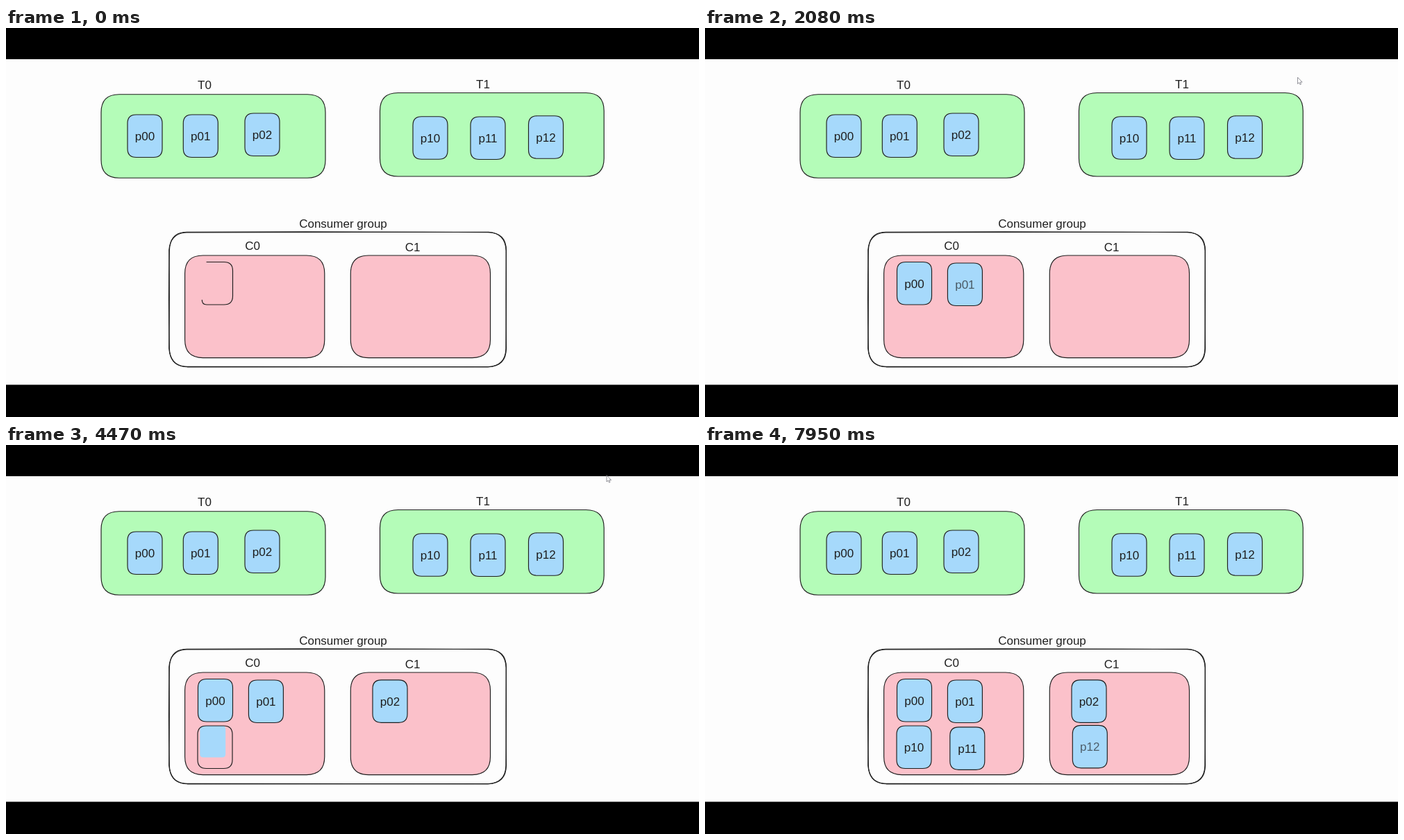
Animation of 998x561 px, one loop 7990 ms. Source, as an HTML page:

```html
<!DOCTYPE html>
<html lang="en">
<head>
<meta charset="utf-8">
<title>Partition assignment</title>
<style>
  html, body { margin: 0; width: 100%; height: 100%; overflow: hidden; background: #000; }
  svg { display: block; width: 100%; height: 100%; }
  path { stroke: #1e1e1e; stroke-width: 1.15; stroke-linecap: round; stroke-linejoin: round; fill: none; }
  text { font: 17px "Liberation Sans", Arial, sans-serif; fill: #1e1e1e; text-anchor: middle; }
</style>
</head>
<body>
<svg id="stage" viewBox="0 0 998 561" xmlns="http://www.w3.org/2000/svg"></svg>
<script>
const LOOP = 7990;
const GREEN = '#b4fcb8', PINK = '#fbc1ca', BLUE = '#a6d9fb';
const CARD = { w: 50, h: 61.5, r: 12.5 };
const stage = document.getElementById('stage');
const clamp = v => Math.min(1, Math.max(0, v));

function add(tag, attrs, text = '') {
  const el = document.createElementNS(stage.namespaceURI, tag);
  for (const name in attrs) el.setAttribute(name, attrs[name]);
  el.textContent = text;
  return stage.appendChild(el);
}

// Rounded box drawn as eight pieces of equal time; the current piece grows from its start.
function boxPath(x, y, w, h, r, progress = 1) {
  const a = w - 2 * r, b = h - 2 * r;
  const pieces = [
    ['l', a, 0], ['q', r, 0, r, r], ['l', 0, b], ['q', 0, r, -r, r],
    ['l', -a, 0], ['q', -r, 0, -r, -r], ['l', 0, -b], ['q', 0, -r, r, -r]
  ];
  let d = `M${x + r} ${y}`;
  pieces.forEach(([cmd, ...nums], i) => {
    const part = clamp(progress * 8 - i);
    if (part > 0) d += cmd + nums.map(n => n * part).join(' ');
  });
  return progress >= 1 ? d + 'z' : d;
}

function box(x, y, w, h, r, fill) {
  return add('path', { d: boxPath(x, y, w, h, r), style: `fill:${fill}` });
}

function label(text, x, middle) {
  return add('text', { x, y: middle + 6 }, text);
}

function card(text, x, y) {
  box(x, y, CARD.w, CARD.h, CARD.r, BLUE);
  label(text, x + 25, y + 31);
}

add('rect', { y: 45, width: 998, height: 469.5, fill: '#fdfdfd' });

box(137, 95.7, 323, 120.5, 26, GREEN);
box(538.5, 93.5, 322.7, 120.5, 26, GREEN);
label('T0', 286, 82.3);
label('T1', 687, 80.5);
card('p00', 175, 125);
card('p01', 255.3, 125);
card('p02', 344, 123);
card('p10', 586, 127.7);
card('p11', 669, 128);
card('p12', 752.5, 126.7);

// Hand-drawn double outline
add('path', { d: 'M261 294.3Q480 293.4 694 294.8Q720.5 295 720.4 321Q719.7 390 720.5 462Q720 488.6 694 488.5Q480 489.3 261 488.8Q235.8 488 235.3 462Q233.6 390 235.3 321Q236 294 261 294.3z' });
add('path', { d: 'M260 294.9Q480 295.2 695 294.2Q719 296 720.2 321Q720.8 390 719.9 463Q719 487.5 694 488.9Q480 488 261 488.4Q237 488 234.7 462Q235.8 390 234.8 320Q237 296 260 294.9z' });
box(257.6, 328, 201.2, 147.6, 26, PINK);
box(496.3, 328, 201.2, 147.6, 26, PINK);
label('Consumer group', 485.5, 282);
label('C0', 355, 314);
label('C1', 585.7, 316);

// Each entry: label, x, y, moment its fill is complete
const assigned = [
  ['p00', 276.5, 337.5, 330],
  ['p01', 349.4, 339, 1614],
  ['p02', 528, 338.8, 2983],
  ['p10', 276, 405, 4515],
  ['p11', 352.8, 406.8, 6060],
  ['p12', 529.3, 404.3, 7484]
].map(([text, x, y, filled], i, all) => ({
  x, y, filled,
  before: i ? filled - all[i - 1][3] : 1430,
  after: i < all.length - 1 ? all[i + 1][3] - filled : 1430,
  fill: add('path', { style: `fill:${BLUE};stroke:none` }),
  line: add('path', {}),
  text: label(text, x + 25, y + 31)
}));

const cursor = add('path', {
  d: 'M0 0V9L2.1 7.2L3.6 10.2L5 9.5L3.6 6.6H6.2z',
  style: 'fill:#fff;stroke:#77777f;stroke-width:.8'
});

function drawCard(c, time) {
  const outline = clamp((time - c.filled + c.before * .5) / (c.before * .39));
  const fill = clamp((time - c.filled + c.before * .11) / (c.before * .11));
  c.line.setAttribute('d', outline ? boxPath(c.x, c.y, CARD.w, CARD.h, CARD.r, outline) : '');
  c.fill.setAttribute('d', fill
    ? boxPath(c.x + CARD.r * (1 - fill), c.y, CARD.w * fill, CARD.h * fill, CARD.r * fill ** 3)
    : '');
  c.text.setAttribute('opacity', clamp((time - c.filled) / (c.after * .5)));
}

function drawCursor(time) {
  const move = clamp((time - 2100) / 90);
  cursor.setAttribute('transform', `translate(${853.5 + 11.5 * move} ${71.5 - 27.5 * move})`);
  cursor.setAttribute('visibility', time >= 1950 && time < 4750 ? 'visible' : 'hidden');
}

const start = performance.now();
function frame() {
  const time = (performance.now() - start) % LOOP;
  assigned.forEach(c => drawCard(c, time));
  drawCursor(time);
  requestAnimationFrame(frame);
}
frame();
</script>
</body>
</html>
```
